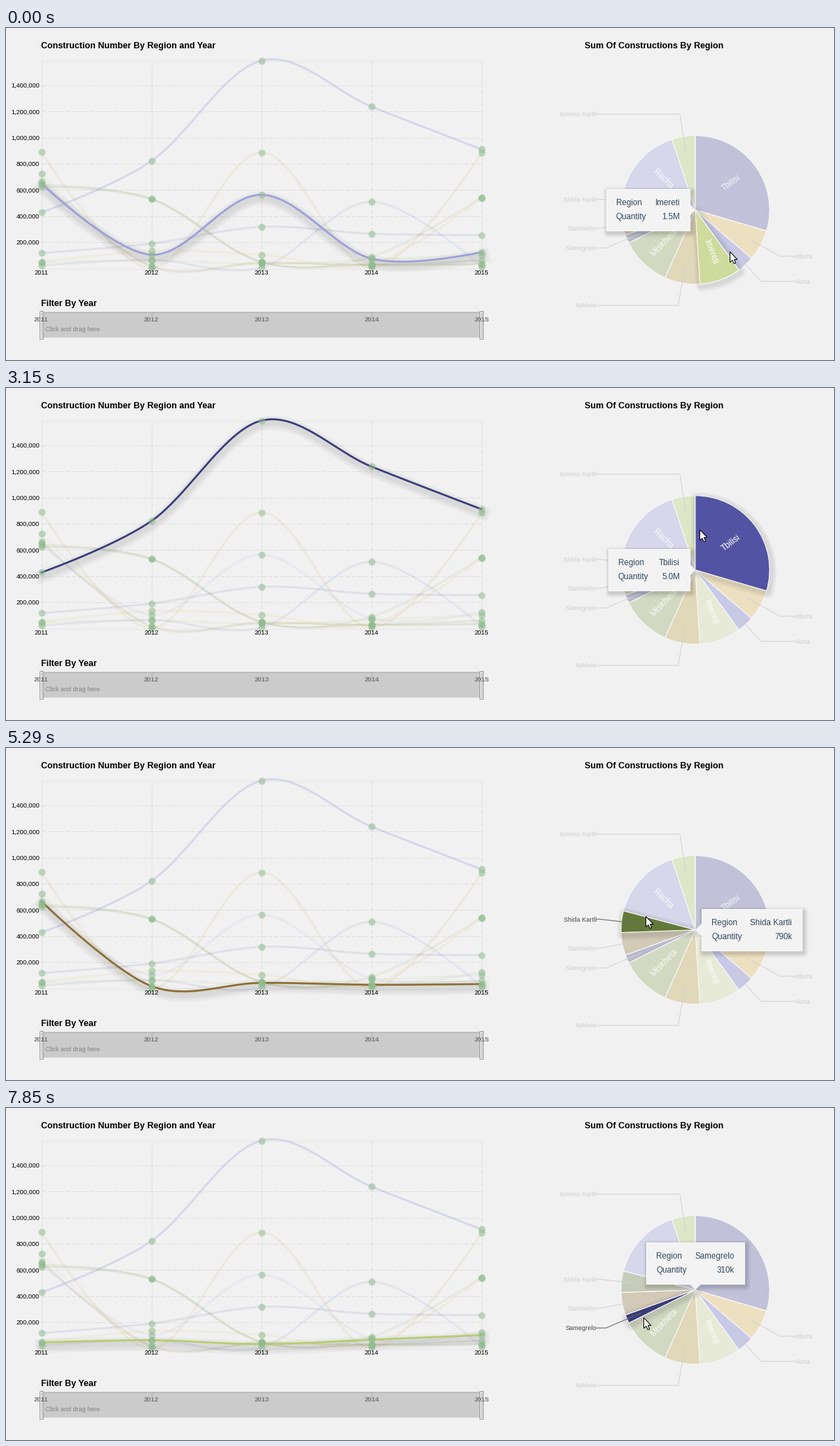
Recreate the animation shown at these times as a matplotlib script. Size 1182x474 px, loop 8000 ms.

```python
import numpy as np
import matplotlib.pyplot as plt
from matplotlib.animation import FuncAnimation
from matplotlib.collections import LineCollection
from matplotlib.patches import Polygon, Rectangle, Wedge

W, H, DPI = 1182, 474, 100
STEP, LOOP = 40, 8000
TICKS = 59            # pointer updates per loop
PX = 72 / DPI
BG = "#f1f1f1"
plt.rcParams.update({"font.family": "Liberation Sans", "lines.dash_capstyle": "butt"})

XS = 50.5 + 157.1 * np.arange(5)
CX, CY, R = 984, 259.7, 106
PALETTE = plt.get_cmap("tab20b").colors

# yearly values in thousands, palette index of the slice
REGIONS = {
    "Tbilisi": ([428, 822, 1590, 1238, 912], 1),
    "Adjara": ([118, 190, 318, 266, 255], 10),
    "Guria": ([22, 65, 8, 510, 15], 2),
    "Imereti": ([650, 105, 563, 75, 125], 7),
    "Kakheti": ([625, 530, 50, 30, 60], 9),
    "Mtskheta": ([640, 533, 50, 90, 545], 5),
    "Samegrelo": ([45, 63, 33, 67, 102], 0),
    "Samtskhe": ([724, 10, 45, 25, 30], 8),
    "Shida Kartli": ([667, 18, 43, 28, 34], 4),
    "Racha": ([890, 2, 888, 5, 885], 3),
    "Kvemo Kartli": ([50, 133, 105, 30, 540], 6),
}
# first tick of each hover
HOVERS = {"Imereti": 0, "Guria": 1, "Adjara": 8, "Tbilisi": 15, "Kvemo Kartli": 24,
          "Racha": 32, "Shida Kartli": 39, "Samtskhe": 47, "Samegrelo": 53}
# tick, x, y of the pointer's turns and rests
PATH = np.array([(0, 1033, 319), (5, 1036, 317), (7, 1042, 311), (9, 1049, 299),
                 (13, 1049, 299), (14, 1046, 285), (17, 1032, 251), (19, 1032, 251),
                 (23, 990, 202), (26, 976, 189), (28, 976, 189), (31, 960, 195),
                 (32, 943, 206), (35, 931, 216), (40, 909, 246), (42, 909, 246),
                 (46, 908, 263), (50, 908, 268), (54, 910, 289), (57, 910, 290),
                 (58, 910, 299)])
ARROW = np.array([(0, 0), (0, 15), (3.4, 12), (5.8, 17), (8.2, 16), (6, 11), (10.5, 11)])

fig = plt.figure(figsize=(W / DPI, H / DPI), dpi=DPI, facecolor=BG)
ax = fig.add_axes([0, 0, 1, 1])
ax.set(xlim=(0, W), ylim=(H, 0))
ax.axis("off")


def level(thousands):
    return 343.3 - np.asarray(thousands) * 37.33 / 200


def polar(angle, radius):
    """Point at a clockwise angle from the top of the pie."""
    a = np.radians(angle)
    return CX + radius * np.sin(a), CY - radius * np.cos(a)


def text(x, y, s, size=9.1, color="k", ha="left", z=6, **kw):
    return ax.text(x, y + 0.36 * size, s, fontsize=size * PX, color=color,
                   ha=ha, va="baseline", zorder=z, **kw)


def line(x, y, color, width=1.0, z=1, **kw):
    return ax.plot(x, y, color=color, lw=width * PX, zorder=z, **kw)[0]


def spline(values):
    """Cardinal curve whose end handles sit on the end points."""
    p = np.column_stack([XS, level(values)])
    m = np.zeros_like(p)
    m[1:-1] = (p[2:] - p[:-2]) / 2
    t = np.linspace(0, 1, 40)[:, None]
    return np.concatenate([
        (2*t**3 - 3*t**2 + 1) * p[i] + (t**3 - 2*t**2 + t) * m[i]
        + (3*t**2 - 2*t**3) * p[i + 1] + (t**3 - t**2) * m[i + 1]
        for i in range(len(p) - 1)])


def wedge(a0, a1, dx=0, dy=0, **kw):
    return ax.add_patch(Wedge((CX + dx, CY + dy), R, a0 - 90, a1 - 90, **kw))


def label(name, a0, a1, alpha, line_color, text_color, z):
    """Write wide slices inside and narrow ones beside the pie."""
    mid = (a0 + a1) / 2
    if a1 - a0 > 30:
        x, y = polar(mid, 64)
        return [ax.text(x, y, name, color="w", alpha=alpha, fontsize=12 * PX,
                        rotation=90 - mid if mid < 180 else 270 - mid, ha="center",
                        va="center", rotation_mode="anchor", zorder=z)]
    side = 1 if mid < 180 else -1
    (x0, y0), (x1, y1) = polar(mid, 85), polar(mid, 138.5)
    end = CX + side * 141
    return [line([x0, x1, end], [y0, y1, y1], line_color, 1, z),
            text(end, y1, name, color=text_color, z=z, ha="left" if side > 0 else "right")]


def tooltip(name, mid, total):
    amount = f"{total / 1000:.1f}M" if total >= 1000 else f"{round(total, -1)}k"
    rows = [(19, "Region", name), (38.5, "Quantity", amount)]
    cells = [[text(0, 0, s, 11.6, "#34495e", ha, 13)
              for s, ha in ((key, "left"), (val, "right"))] for _, key, val in rows]
    widths = np.array([[c.get_window_extent().width for c in row] for row in cells])
    w = max(116, 40 + widths.max(axis=0).sum())

    tip = np.array([CX, CY])
    if mid < 180:
        x0, y0, base = CX - 8 - w, 230, [(-8, -9), (-8, 9)]
    elif mid < 255:
        x0, y0, base = CX - w / 2, 192, [(9, -9), (-9, -9)]
    else:
        x0, y0, base = CX + 9, 230, [(9, 9), (9, -9)]
    x1, y1 = x0 + w, y0 + 59
    box = np.array([(x0, y0), (x1, y0), (x1, y1), (x0, y1)])
    beak = np.array([tip + base[0], tip, tip + base[1]])
    out = [ax.add_patch(Polygon(box + (2, 3), facecolor="none", edgecolor="k", alpha=.04,
                                lw=lw * PX, joinstyle="round", zorder=11))
           for lw in (3, 6, 9, 13)]
    out.append(ax.add_patch(Polygon(box, facecolor="#f3f3f3", edgecolor="#fafafa",
                                    lw=PX, zorder=12)))
    out.append(ax.add_patch(Polygon(beak, facecolor="#f3f3f3", lw=0, zorder=12)))
    for (dy, *_), (key, val) in zip(rows, cells):
        y = y0 + dy + 0.36 * 11.6
        key.set_position((x0 + 14, y))
        val.set_position((x1 - 14, y))
        out += [key, val]
    return out


def draw_axes():
    for x, y, s in ((50.5, 24, "Construction Number By Region and Year"),
                    (825.5, 24, "Sum Of Constructions By Region"),
                    (50.5, 392, "Filter By Year")):
        text(x, y, s, 12.5, weight="bold")
    ends = XS[[0, -1]]
    for k in range(200, 1401, 200):
        line(ends, [level(k)] * 2, "#dedede", dashes=(6, 2.5))
        text(48, level(k), f"{k * 1000:,}", ha="right")
    for y in (46.5, 343.5):
        line(ends, [y, y], "#e6e6e6")
    for i, x in enumerate(XS):
        line([x, x], [46, 343], "#dedede", dashes=(6, 2.5))
        text(x, 348.5, 2011 + i, ha="center", z=7)


def draw_slider():
    x0, x1 = XS[0], XS[-1]
    ax.add_patch(Rectangle((x0, 405), x1 - x0, 37, color="#cbcbcb", lw=0))
    line([x0, x1], [405.5, 405.5], "#b4b4b4", z=2)
    for i, x in enumerate(XS):
        line([x, x], [405, 411], "#b0b0b0", z=2)
        text(x, 416, 2011 + i, 9.4, "#787878", "center", weight="bold")
    text(56.5, 429.5, "Click and drag here", 8.9, "#808080")
    for x in (x0, x1):
        ax.add_patch(Rectangle((x - 2.5, 403.5), 5, 40, facecolor="#ececec",
                               edgecolor="#9c9c9c", lw=PX, zorder=3))
        line([x, x], [406, 442], "#a8a8a8", z=4)


def draw_region(name, a0, a1, stroke):
    """Add the dim look and return the hidden artists of the hover look."""
    values, index = REGIONS[name]
    fill = PALETTE[index]
    wedge(a0, a1, facecolor=fill, alpha=.3, lw=0, zorder=2)
    wedge(a0, a1, facecolor="none", edgecolor="#f8f8f8", lw=PX, zorder=2.1)
    label(name, a0, a1, .85, "#d0d0d0", "#cfcfcf", 3)
    if name not in HOVERS:
        return []

    x, y = spline(values).T
    out = [line(x, y, stroke, 2.6, 4)]
    for lw in (20, 14, 8):
        out.append(line(x + 1, y + 5, "k", lw, 3, alpha=.03))
        out.append(wedge(a0, a1, 2, 3, facecolor="none", edgecolor="k", alpha=.035,
                         lw=lw * .8 * PX, joinstyle="round", zorder=4))
    out.append(wedge(a0, a1, facecolor=fill, edgecolor="w", lw=PX, zorder=5))
    out += label(name, a0, a1, 1, "#6a6a6a", "#555555", 7)
    out += tooltip(name, (a0 + a1) / 2, sum(values))
    return out


draw_axes()
draw_slider()
data = np.array([values for values, _ in REGIONS.values()])
# the leading series stays a little stronger when dimmed
dim = [(*PALETTE[2], .19)] + [(*c, .1) for c in PALETTE[1:len(data)]]
ax.add_collection(LineCollection([spline(v) for v in data], colors=dim,
                                 linewidths=3 * PX, zorder=2))
ax.scatter(np.tile(XS, len(data)), level(data).ravel(), s=(10 * PX) ** 2,
           color="#8fbc8f", alpha=.55, lw=0, zorder=5)

bounds = np.append(0, 360 * np.cumsum(data.sum(axis=1)) / data.sum())
hover = {name: draw_region(name, *span)
         for name, *span in zip(REGIONS, bounds, bounds[1:], PALETTE)}
cursor = ax.add_patch(Polygon(ARROW, facecolor="w", edgecolor="k", lw=PX, zorder=20))


def update(i):
    tick = int(i * STEP * TICKS / LOOP + .35)
    current = [name for name, first in HOVERS.items() if first <= tick][-1]
    for name, group in hover.items():
        for art in group:
            art.set_visible(name == current)
    spot = [np.interp(tick, PATH[:, 0], PATH[:, k]) for k in (1, 2)]
    cursor.set_xy(ARROW + np.round(spot) + .5)
    return [cursor]


anim = FuncAnimation(fig, update, frames=LOOP // STEP, interval=STEP,
                     repeat=True, repeat_delay=0, blit=False)
plt.show()
```
